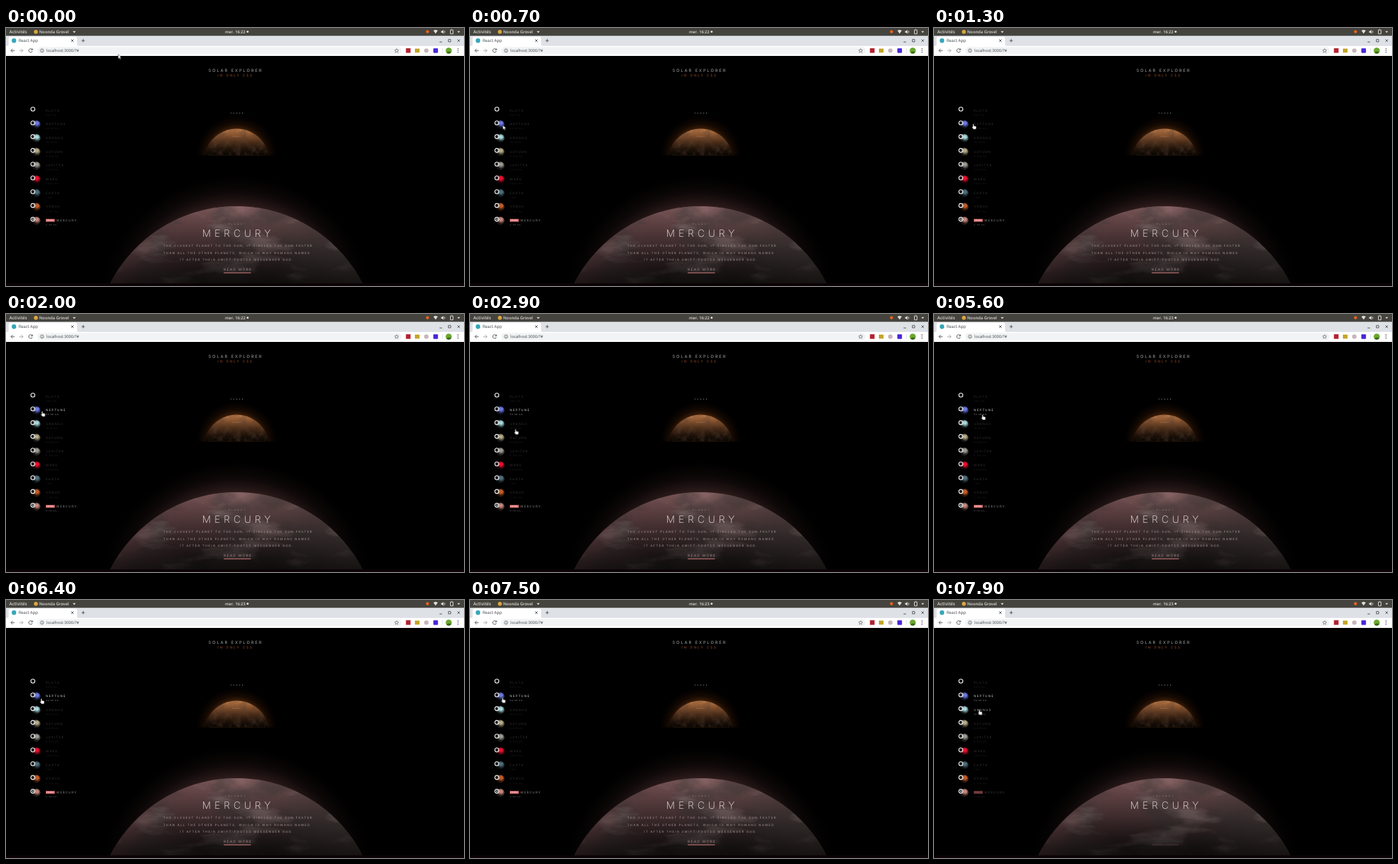
An HTML page that plays this animation: 690x388 px, repeating every 8000 ms.

```html
<!DOCTYPE html>
<html lang="fr">
<head>
<meta charset="utf-8">
<title>React App</title>
<style>
  html, body { margin: 0; width: 100%; height: 100%; overflow: hidden; background: #000; }
  svg { display: block; width: 100vw; height: 100vh; }
  text { text-rendering: geometricPrecision; white-space: pre; }
  .ui { font-family: "Open Sans", "Noto Sans", sans-serif; }
  .page { font-family: Inter, "Open Sans", sans-serif; }
  .name { font-size: 4.6px; letter-spacing: 1.25px; fill: #d8d8d8; }
  .distance { font-size: 3px; letter-spacing: .8px; fill: #a8a8a8; }
  .copy { font-size: 4.5px; letter-spacing: 1.45px; fill: #a89a9a; }
  .line { fill: none; stroke: #55585c; stroke-width: 1; }
  .panel { fill: none; stroke: #dedbd5; stroke-width: 1; }

  .row { opacity: .24; }
  .anim, .row-neptune, .row-uranus, .row-mercury { animation: 8s linear infinite; }
  .row-neptune { animation-name: neptune; }
  .row-uranus { animation-name: uranus; }
  .row-mercury { animation-name: mercury; }
  .badge { animation-name: badge; }
  #cursor { animation-name: move; }
  #arrow { animation-name: early; }
  #hand { animation-name: late; }
  #before { animation-name: clock-out; }
  #after { animation-name: clock-in; }
  .fading { animation-name: copy-out; }
  #rule { animation-name: rule-out; }

  @keyframes neptune { 0%, 16.25% { opacity: .24 } 23.75%, 100% { opacity: .95 } }
  @keyframes uranus { 0%, 95% { opacity: .24 } 98.75%, 100% { opacity: .75 } }
  @keyframes mercury { 0%, 93.75% { opacity: .65 } 98.75%, 100% { opacity: .27 } }
  @keyframes badge { 0%, 93.75% { opacity: 1 } 98.75%, 100% { opacity: .5 } }
  @keyframes copy-out { 0%, 93.75% { opacity: 1 } 98.5%, 100% { opacity: 0 } }
  @keyframes rule-out { 0%, 93.75% { opacity: 1 } 98.75%, 100% { opacity: .25 } }
  @keyframes early { 0%, 12.49% { opacity: 1 } 12.5%, 100% { opacity: 0 } }
  @keyframes late { 0%, 12.49% { opacity: 0 } 12.5%, 100% { opacity: 1 } }
  @keyframes clock-out { 0%, 43.74% { opacity: 1 } 43.75%, 100% { opacity: 0 } }
  @keyframes clock-in { 0%, 43.74% { opacity: 0 } 43.75%, 100% { opacity: 1 } }
  /* The pointer advances in ticks of 100 ms. */
  @keyframes move {
    0% { transform: translate(169px, 39.5px); animation-timing-function: steps(6); }
    7.5%, 11.25% { transform: translate(49.5px, 146px); animation-timing-function: steps(4); }
    16.25%, 22.5% { transform: translate(57px, 144px); animation-timing-function: steps(3); }
    26.25%, 28.75% { transform: translate(50px, 147px); animation-timing-function: steps(6); }
    36.25%, 38.75% { transform: translate(66.5px, 173px); animation-timing-function: steps(4); }
    43.75% { transform: translate(50px, 149px); animation-timing-function: steps(4); }
    48.75%, 61.25% { transform: translate(73px, 150px); animation-timing-function: steps(4); }
    66.25% { transform: translate(67px, 158px); animation-timing-function: steps(3); }
    70%, 71.25% { transform: translate(71px, 151px); animation-timing-function: steps(1); }
    72.5% { transform: translate(73px, 172px); animation-timing-function: steps(2); }
    75%, 76.25% { transform: translate(73px, 165px); animation-timing-function: steps(3); }
    80% { transform: translate(51px, 148px); animation-timing-function: steps(2); }
    82.5%, 92.5% { transform: translate(42px, 142px); animation-timing-function: steps(5); }
    98.75%, 100% { transform: translate(66px, 164.5px); }
  }
</style>
</head>
<body>
<svg viewBox="0 0 690 388" xmlns="http://www.w3.org/2000/svg">
  <defs>
    <radialGradient id="halo" gradientUnits="userSpaceOnUse" cx="347" cy="430" r="210">
      <stop offset=".76" stop-color="#7a4a4a" stop-opacity=".42"/>
      <stop offset=".87" stop-color="#5a3434" stop-opacity=".17"/>
      <stop offset="1" stop-color="#301818" stop-opacity="0"/>
    </radialGradient>
    <radialGradient id="rock" gradientUnits="userSpaceOnUse" cx="347" cy="482" r="214">
      <stop offset=".55" stop-color="#2a2020"/>
      <stop offset=".82" stop-color="#4a3335"/>
      <stop offset=".96" stop-color="#5f4143"/>
      <stop offset="1" stop-color="#644547"/>
    </radialGradient>
    <radialGradient id="sunlit" gradientUnits="userSpaceOnUse" cx="347" cy="258" r="125">
      <stop offset="0" stop-color="#d0a09e" stop-opacity=".5"/>
      <stop offset=".4" stop-color="#b08080" stop-opacity=".2"/>
      <stop offset="1" stop-color="#b08080" stop-opacity="0"/>
    </radialGradient>
    <linearGradient id="ash">
      <stop offset=".5" stop-color="#3a3834" stop-opacity="0"/>
      <stop offset=".85" stop-color="#3a3834" stop-opacity=".6"/>
    </linearGradient>
    <linearGradient id="dusk" x2="0" y2="1">
      <stop offset="0" stop-opacity="0"/>
      <stop offset=".5" stop-opacity=".22"/>
      <stop offset="1" stop-opacity=".68"/>
    </linearGradient>
    <radialGradient id="ember" gradientUnits="userSpaceOnUse" cx="347.5" cy="193" r="62">
      <stop offset=".6" stop-color="#b05a1c" stop-opacity=".55"/>
      <stop offset=".78" stop-color="#6a300a" stop-opacity=".22"/>
      <stop offset="1" stop-color="#301404" stop-opacity="0"/>
    </radialGradient>
    <linearGradient id="amber" gradientUnits="userSpaceOnUse" x1="0" y1="151" x2="0" y2="192">
      <stop offset="0" stop-color="#bd7d4a"/>
      <stop offset=".22" stop-color="#8a5732"/>
      <stop offset=".5" stop-color="#4c2d18"/>
      <stop offset=".75" stop-color="#1f130a"/>
      <stop offset="1" stop-color="#070402"/>
    </linearGradient>
    <radialGradient id="shade" cx=".58" cy=".36" r=".62">
      <stop offset=".25" stop-opacity="0"/>
      <stop offset="1" stop-opacity="1"/>
    </radialGradient>
    <filter id="terrain" x="0" y="0" width="1" height="1">
      <feTurbulence type="fractalNoise" baseFrequency=".016 .022" numOctaves="5" seed="8"/>
      <feColorMatrix values="0 0 0 0 .05  0 0 0 0 .04  0 0 0 0 .04  4 0 0 0 -1.7"/>
      <feComposite in2="SourceGraphic" operator="in"/>
    </filter>
    <filter id="wisps" x="0" y="0" width="1" height="1">
      <feTurbulence type="fractalNoise" baseFrequency=".012 .035" numOctaves="5" seed="21"/>
      <feColorMatrix values="0 0 0 0 .62  0 0 0 0 .5  0 0 0 0 .48  0 4 0 0 -2.1"/>
      <feComposite in2="SourceGraphic" operator="in"/>
    </filter>
    <filter id="mottle" x="0" y="0" width="1" height="1">
      <feTurbulence type="fractalNoise" baseFrequency=".11 .09" numOctaves="4" seed="3"/>
      <feColorMatrix values="0 0 0 0 .1  0 0 0 0 .05  0 0 0 0 .03  2.4 0 0 0 -1"/>
      <feComposite in2="SourceGraphic" operator="in"/>
    </filter>
    <clipPath id="venus-clip"><rect x="270" y="110" width="160" height="81.5"/></clipPath>
    <clipPath id="page-clip"><rect y="42" width="690" height="342"/></clipPath>
  </defs>

  <rect width="690" height="388"/>

  <g class="page">
    <text x="305" y="66.2" font-size="6.1" letter-spacing="2.07" fill="#adadad">SOLAR EXPLORER</text>
    <text x="319" y="73" font-size="5" letter-spacing="2" fill="#9a5230">IN ONLY CSS</text>

    <text x="338" y="129" font-size="2.7" letter-spacing="2.5" fill="#b5b5b5">VENUS</text>
    <g clip-path="url(#venus-clip)">
      <circle cx="347.5" cy="193" r="62" fill="url(#ember)"/>
      <circle cx="347.5" cy="200.5" r="49" fill="url(#amber)"/>
      <circle cx="347.5" cy="200.5" r="49" filter="url(#mottle)" opacity=".5"/>
      <text x="341" y="163.5" font-size="2.6" letter-spacing=".4" fill="#d0aa88" opacity=".6">PLANET</text>
    </g>

    <g clip-path="url(#page-clip)">
      <circle cx="347" cy="430" r="210" fill="url(#halo)"/>
      <circle cx="347" cy="482" r="214" fill="url(#rock)"/>
      <circle cx="347" cy="482" r="214" fill="url(#ash)"/>
      <circle cx="347" cy="482" r="214" fill="url(#sunlit)"/>
      <circle cx="347" cy="482" r="214" filter="url(#terrain)" opacity=".5"/>
      <circle cx="347" cy="482" r="214" filter="url(#wisps)" opacity=".3"/>
      <rect x="110" y="268" width="474" height="116" fill="url(#dusk)"/>
    </g>
    <rect y="384" width="690" height="4" fill="#0b0305"/>

    <text x="335" y="295.8" font-size="3.4" letter-spacing="2.4" fill="#b5a5a5" opacity=".7">PLANET</text>
    <text x="295.5" y="313.6" font-size="14.8" font-weight="200" letter-spacing="5.3" fill="#f2eeee">MERCURY</text>
    <g class="anim fading">
      <g class="copy">
        <text x="237" y="329.2">THE CLOSEST PLANET TO THE SUN, IT CIRCLES THE SUN FASTER</text>
        <text x="237" y="339.8">THAN ALL THE OTHER PLANETS, WHICH IS WHY ROMANS NAMED</text>
        <text x="262" y="350.3">IT AFTER THEIR SWIFT-FOOTED MESSENGER GOD.</text>
      </g>
      <text x="328" y="365" font-size="5" letter-spacing="1.5" fill="#a98c8c">READ MORE</text>
    </g>
    <rect id="rule" class="anim" x="328" y="367.6" width="41" height="1.1" fill="#c87878"/>
    <g id="planets"></g>
  </g>

  <g class="ui">
    <rect width="690" height="11.6" fill="#45433e"/>
    <g font-size="6.5" font-weight="600" fill="#dedbd5">
      <text x="5" y="8.2">Activités</text>
      <text x="50" y="8.2" font-size="6.2">Noonda Grovel</text>
      <text id="before" class="anim" x="330" y="8.2" font-size="6.1">mer. 16:22</text>
      <text id="after" class="anim" x="330" y="8.2" font-size="6.1">mer. 16:23</text>
    </g>
    <circle cx="45" cy="5.8" r="3" fill="#d9a63c"/>
    <circle cx="364" cy="5.6" r="1.6" fill="#dedbd5"/>
    <path d="M100.5 4.8h4.6l-2.3 2.6zM679.8 4.8h4.4l-2.2 2.5zM644 4q3.2-2.4 6.4 0l-3.2 4.4zM655.5 4.6h1.6l2-1.8v6l-2-1.8h-1.6z" fill="#dedbd5"/>
    <path class="panel" d="M660.5 4q1.4 1.8 0 3.6M669.5 3h4v5.8h-4zM671 2h1"/>
    <circle cx="635" cy="5.6" r="2.3" fill="#e8641b"/>

    <rect y="11.6" width="690" height="15.4" fill="#dee1e6"/>
    <path d="M2 27q2 0 2-3v-8q0-3 3-3h97q3 0 3 3v8q0 3 2 3z" fill="#fff"/>
    <circle cx="12" cy="19" r="3.4" fill="#35a6b8"/>
    <text x="19" y="21.3" font-size="6.2" fill="#3c4043">React App</text>
    <path class="line" d="M98.2 17.2l3.6 3.6m0-3.6l-3.6 3.6M113.8 19h5m-2.5-2.5v5M653 21h4M666.4 17.2h3.6v3.6h-3.6zM680.2 17.2l3.6 3.6m0-3.6l-3.6 3.6"/>

    <rect y="27" width="690" height="15" fill="#fff"/>
    <rect x="47" y="28.6" width="549" height="11" rx="5.5" fill="#f1f3f4"/>
    <path class="line" d="M13 34H7.5m2.5-2.6L7.4 34l2.6 2.6M39.6 32.6a2.8 2.8 0 1 0 .1 2.4M40 30.8v2.2h-2.3"/>
    <path class="line" stroke-opacity=".5" d="M20 34h5.5m-2.5-2.6l2.6 2.6-2.6 2.6"/>
    <circle class="line" cx="54.3" cy="34" r="2.6" style="stroke-width:.7"/>
    <path class="line" d="M54.3 32.3v.7m0 .7v2" style="stroke-width:.8"/>
    <text x="61" y="36.2" font-size="6" fill="#3c4043">localhost:3000/?#</text>
    <path class="line" style="stroke-width:.7" d="M588.5 31l.9 2 2.1.2-1.6 1.4.5 2.1-1.9-1.1-1.9 1.1.5-2.1-1.6-1.4 2.1-.2z"/>
    <rect x="602.5" y="30.4" width="7" height="7" fill="#b3202e"/>
    <rect x="616" y="31" width="7" height="6" fill="#c5a52a"/>
    <circle cx="633.3" cy="34" r="3.3" fill="#c9b5b8"/>
    <rect x="643.8" y="30.5" width="7" height="7" rx="1" fill="#4a25d8"/>
    <path d="M657.5 30.5v7" stroke="#d5d8dc" stroke-width=".7"/>
    <circle cx="667" cy="34" r="4.6" fill="#69a82f"/>
    <path d="M663.5 37a4.6 4.6 0 0 0 7.3-.4q-3.5-3-7.3.4z" fill="#38661d"/>
    <g fill="#55585c"><circle cx="681" cy="31.4" r=".8"/><circle cx="681" cy="34" r=".8"/><circle cx="681" cy="36.6" r=".8"/></g>
  </g>

  <g id="cursor" class="anim" fill="#fff" stroke="#111" stroke-width=".5" stroke-linejoin="round">
    <path id="arrow" class="anim" d="M0 0v6.8l1.6-1.4 1.1 2.4 1.2-.5-1.1-2.4h2.1z"/>
    <path id="hand" class="anim" d="M1.4.7q.8-1 1.6 0v2.4l2.9.6q1 .3.9 1.4l-.5 3.1H2.4L0 5q.3-1 1.4.1z"/>
  </g>
</svg>

<script>
  const planets = [
    ["PLUTO", "39.5 AU", "#000"],
    ["NEPTUNE", "30.06 AU", "#6d7be8"],
    ["URANUS", "19.18 AU", "#a6dce0"],
    ["SATURN", "9.539 AU", "#b8ad88"],
    ["JUPITER", "5.203 AU", "#a09c92"],
    ["MARS", "1.524 AU", "#f01030"],
    ["EARTH", "1 AU", "#50707f"],
    ["VENUS", "0.723 AU", "#c8602a"],
    ["MERCURY", "0.39 AU", "#c98880"],
  ];

  const rowMarkup = ([name, distance, color], i) => {
    const current = name === "MERCURY";
    const y = 122 + 20.7 * i;
    const ball = fill => `<circle cx="45.8" cy="${y + 2}" r="5.8" fill="${fill}"/>`;
    const badge = current
      ? `<rect class="anim badge" x="60" y="${y - .4}" width="13.5" height="4.2" fill="#e27478"/>
         <text class="anim fading" x="61.4" y="${y + 2.8}"
           font-size="2.8" letter-spacing=".8" fill="#fff">HERE</text>`
      : "";
    const dot = current ? `<circle cx="40.5" cy="${y}" r="1" fill="#fff"/>` : "";
    return `${ball(color)}${ball("url(#shade)")}
      <circle cx="40.5" cy="${y}" r="3" fill="none" stroke="#fff" stroke-width="1.1"/>${dot}
      ${badge}
      <g class="row row-${name.toLowerCase()}">
        <text class="name" x="${current ? 76 : 60}" y="${y + 3.5}">${name}</text>
        <text class="distance" x="60" y="${y + 9.6}">${distance}</text>
      </g>`;
  };

  document.getElementById("planets").innerHTML = planets.map(rowMarkup).join("");
</script>
</body>
</html>
```
